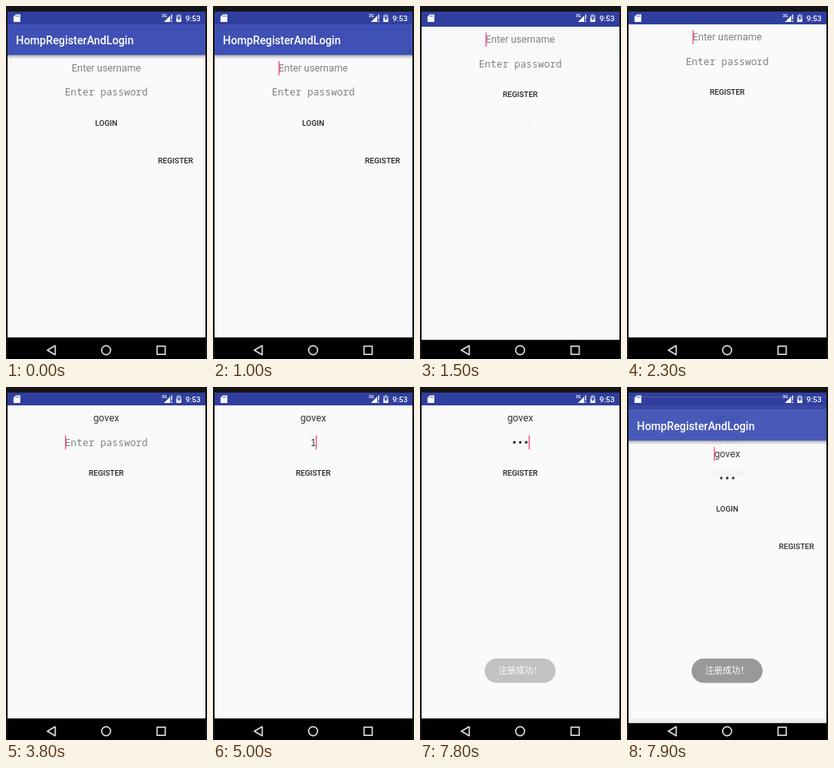
Animation of 252 by 442 pixels, one loop 8 s. Source, as an HTML page:

```html
<!DOCTYPE html>
<html lang="zh-CN">
<head>
<meta charset="utf-8">
<title>Register and login</title>
<style>
html, body { margin: 0; width: 100%; height: 100%; overflow: hidden; background: #141414; }
svg { display: block; width: 252px; height: 442px; }
text { font: 12.4px Roboto, sans-serif; fill: #333; }
.mid { text-anchor: middle; }
.hint { fill: #828282; }
.mono { font-family: "Noto Sans Mono", monospace; }
.button { font-size: 9.65px; font-weight: 500; fill: #222; }
.title { font-size: 13.8px; font-weight: 500; fill: #fff; }
.clock { font-size: 9.65px; font-weight: 500; fill: #fff; }
.net { font-size: 5px; font-weight: 700; fill: #fff; }
.toast { font: 11px "Noto Sans CJK SC", "Noto Sans CJK", sans-serif; fill: #fff; }
</style>
</head>
<body>
<svg viewBox="0 0 252 442">
  <defs>
    <linearGradient id="shade" x2="0" y2="1">
      <stop stop-opacity=".28"/><stop offset="1" stop-opacity="0"/>
    </linearGradient>
  </defs>
  <rect x="2" y="415" width="248" height="27"/>
  <g id="screens"></g>
  <g id="status" fill="#fff">
    <path d="M12.3 10.5H18V20H9.5V13.3Z"/>
    <path d="M12.6 11.7v2M14.4 11.7v2M16.2 11.7v2" stroke="#303f9f" stroke-width=".8"/>
    <text class="net" x="195.3" y="13.7">3G</text>
    <path d="M198 20 206 12V20ZM207 10.5h1.3v6.3H207ZM207 18.2h1.3V20H207Z"/>
    <path d="M213.5 11.3h1.9V10.2h2.4v1.1h1.9V15h-6.2Z" opacity=".55"/>
    <path d="M213.5 15h6.2v5h-6.2Z"/>
    <path d="M217.2 12.3 214.8 16.2h1.6v2.6l2.2-3.9h-1.4Z" fill="#303f9f"/>
    <text class="clock" x="225" y="18.6">9:53</text>
  </g>
  <g fill="none" stroke="#e0e0e0" stroke-width="1.6">
    <path d="M61.7 425.3V436.7L51.8 431Z" stroke-linejoin="round"/>
    <circle cx="125.5" cy="431" r="5.6"/>
    <rect x="189.4" y="426" width="10.2" height="10.2"/>
  </g>
  <g id="toast">
    <rect x="81" y="340" width="89" height="30.5" rx="15.2" fill="#505050"/>
    <text class="toast mid" x="125.5" y="359.4">注册成功！</text>
  </g>
</svg>
<script>
const LOOP = 8000, STEP = 100, MID = 125.7, ADVANCE = 7.44;
const USER = 'govex', DIGITS = '123';
const BLINKS = [100, 600, 1000, 1900, 2300, 3500, 3800, 4300, 4800, 6100, 6500, 7000, 7500];
const screens = document.getElementById('screens');
const toast = document.getElementById('toast');
const pen = document.createElement('canvas').getContext('2d');

const label = (cls, x, y, s) => `<text class="${cls}" x="${x}" y="${y}">${s}</text>`;
const rect = (y, h, fill) => `<rect x="2" y="${y}" width="248" height="${h}" fill="${fill}"/>`;
const caret = (x, y) => `<rect x="${x - .6}" y="${y - 13}" width="1.3" height="17.5" fill="#ff4081"/>`;

function userWidth(s) {
  pen.font = '12.4px Roboto, sans-serif';
  return pen.measureText(s).width;
}

function password(digits, masked, y) {
  const left = MID - digits.length * ADVANCE / 2;
  return [...digits].map((d, i) => {
    const x = left + (i + .5) * ADVANCE;
    return i < masked ? `<circle cx="${x}" cy="${y - 4.3}" r="1.7" fill="#333"/>`
                      : label('mono mid', x, y, d);
  }).join('');
}

function form({ user = '', digits = '', masked = 0, caretX, caretInPassword, button }) {
  const u = 82.2, p = 112.4;
  return (user ? label('mid', MID, u, user) : label('mid hint', MID, u, 'Enter username'))
    + (digits ? password(digits, masked, p) : label('mono mid hint', MID, p, 'Enter password'))
    + label('button mid', MID, 150, button)
    + (caretX ? caret(caretX, caretInPassword ? p : u) : '');
}

// Window entrance: quick fade plus a slide up over 8% of the height
function enter(content, age) {
  const left = ms => Math.max(0, 1 - age / ms);
  const dy = 34.7 * left(350) ** 5, alpha = 1 - left(200) ** 4;
  return `<g opacity="${alpha}" transform="translate(0 ${dy})">`
    + rect(7, 408, '#fafafa') + rect(7, 16, '#303f9f') + content + '</g>';
}

function login(fields) {
  return rect(23, 38.5, '#3f51b5') + rect(61.5, 5, 'url(#shade)')
    + label('title', 12.6, 47.8, 'HompRegisterAndLogin')
    + form({ ...fields, button: 'LOGIN' })
    + label('button', 190.6, 196.8, 'REGISTER');
}

function register(t, blink) {
  const user = t < 2600 ? '' : USER.slice(0, (t - 2600) / STEP + 1);
  const count = [5000, 5300, 5600].filter(s => t >= s).length;
  const digits = DIGITS.slice(0, count);
  const masked = t < 7000 ? count - 1 : count;
  const caretInPassword = t >= 3800;
  const x = caretInPassword
    ? (count ? MID + count * ADVANCE / 2 : 74.6)
    : (user ? MID + userWidth(user) / 2 + .5 : 82.8);
  const fields = { user, digits, masked, caretInPassword, caretX: blink && x, button: 'REGISTER' };
  return `<g transform="translate(0 -38.8)">${form(fields)}</g>`;
}

function draw(t) {
  const blink = BLINKS.filter(b => b <= t).length % 2 === 1;
  let out = '';
  if (t < 1600) out += enter(login({ caretX: blink && 82.8 }), 1e4);
  if (t >= 1400) out += enter(register(t, blink), t - 1400 + 36);
  if (t >= 7900) {
    const caretX = MID - userWidth(USER) / 2;
    out += enter(login({ user: USER, digits: DIGITS, masked: 3, caretX }), t - 7900 + 105);
  }
  screens.innerHTML = out;
  toast.setAttribute('opacity', t < 7800 ? 0 : t < 7900 ? .32 : .57);
  toast.lastElementChild.setAttribute('opacity', 1);
}

let shown = -1;
const start = performance.now();
function tick() {
  const t = Math.floor((performance.now() - start) % LOOP / STEP) * STEP;
  if (t !== shown) draw(shown = t);
  requestAnimationFrame(tick);
}
tick();
</script>
</body>
</html>
```
